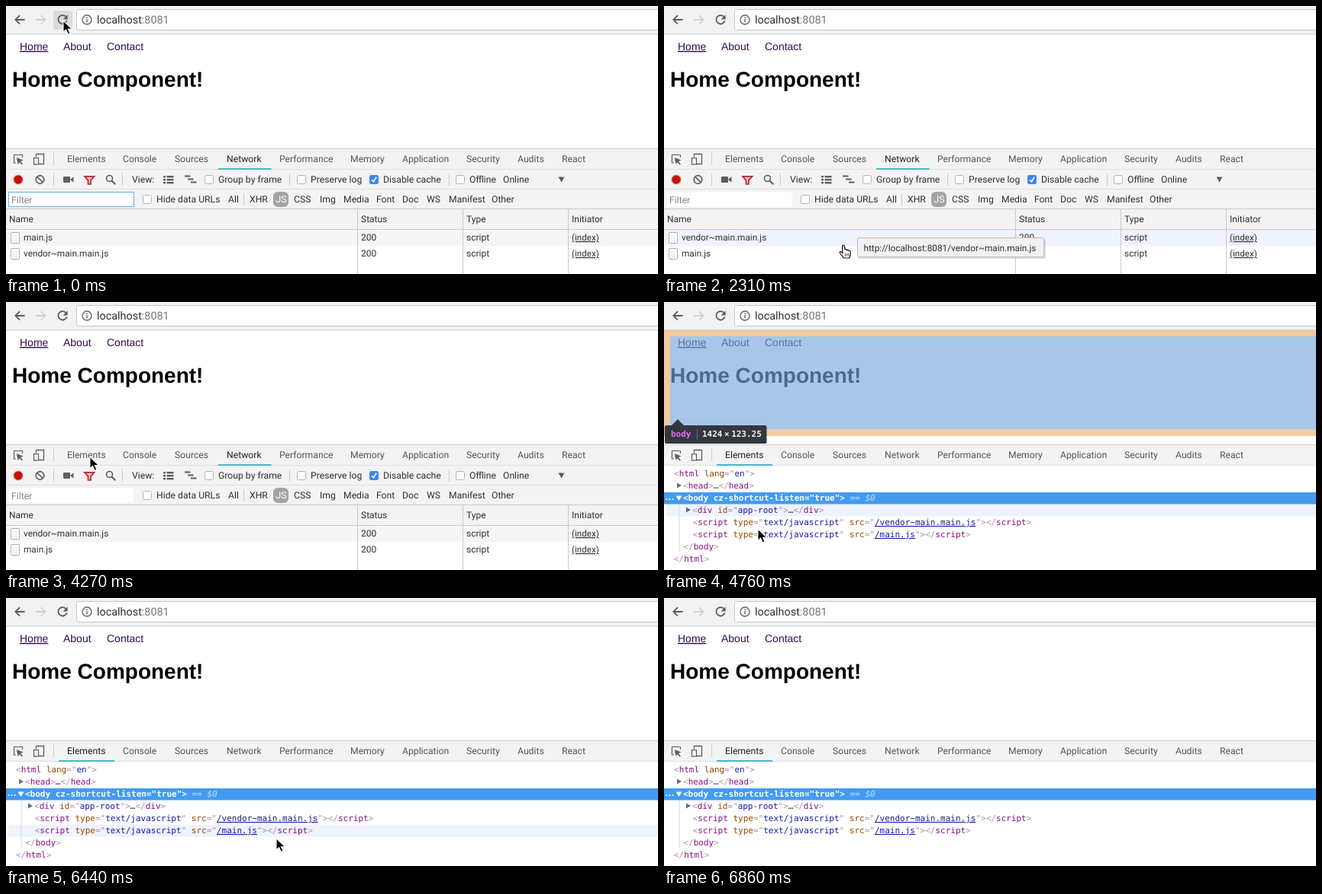
Recreate the animation shown at these times as an HTML page. Size 854 by 352 pixels, loop 6.93 s.

```html
<!DOCTYPE html>
<html lang="en">
<head>
<meta charset="utf-8">
<title>Reloading with developer tools</title>
<style>
html, body { margin: 0; width: 100%; height: 100%; overflow: hidden; background: #fff; }
svg { display: block; width: 854px; height: 352px; }
text { white-space: pre; text-rendering: geometricPrecision; font: 12px Roboto, Arial, sans-serif; fill: #303030; }
text.page { font-family: "Liberation Sans", Arial, sans-serif; fill: #30104c; }
text.code { font: 11px "DejaVu Sans Mono", monospace; fill: #a894a6; }
.n { fill: #881280; }
.a { fill: #994500; }
.v { fill: #1a1aa6; }
.u { text-decoration: underline; }
</style>
</head>
<body>
<svg id="stage" viewBox="0 0 854 352"></svg>
<script>
const LOOP = 6930, STEP = 70;

const rect = (x, y, w, h, fill, more = '') =>
  `<rect x="${x}" y="${y}" width="${w}" height="${h}" fill="${fill}" ${more}/>`;
const path = (d, stroke, width = 1, fill = 'none') =>
  `<path d="${d}" stroke="${stroke}" stroke-width="${width}" fill="${fill}"/>`;
const label = (x, y, str, size = 12, more = '') =>
  `<text x="${x}" y="${y}" style="font-size:${size}px" ${more}>${str}</text>`;
const group = (id, body) => `<g id="${id}">${body}</g>`;
const hline = (y, color = '#cbcbcb') => rect(0, y, 854, 1, color);
const vline = (x, y, h, color = '#cbcbcb') => rect(x, y, 1, h, color);

function browserBar() {
  return rect(0, 0, 854, 37, '#f2f2f2') + hline(36.5, '#cfcfcf')
    + rect(62, 6, 25, 25, '#dcdcdc', 'rx="3" id="buttonHover"')
    + path('M24.5 18H12.5M18 12.3L12.3 18L18 23.7', '#5a5a5a', 1.8)
    + path('M39.5 18H51.5M46 12.3L51.7 18L46 23.7', '#d0d0d0', 1.8)
    + group('reload', path('M78.6 14.2A5.7 5.7 0 1 0 79.6 19.5', '#5a5a5a', 1.8)
      + path('M80.6 11.5V17.4H74.7Z', 'none', 0, '#5a5a5a'))
    + group('stop', path('M69 13L79 23M79 13L69 23', '#5a5a5a', 1.8))
    + rect(92.5, 4.5, 780, 27, '#fff', 'rx="3" stroke="#c6c6c6"')
    + '<circle cx="106" cy="18" r="6" fill="none" stroke="#5f5f5f" stroke-width="1.3"/>'
    + rect(105.3, 17, 1.4, 4.4, '#5f5f5f') + rect(105.3, 14.4, 1.4, 1.5, '#5f5f5f')
    + label(119, 23, 'localhost<tspan fill="#777">:8081</tspan>', 14.4, 'fill="#222"');
}

function webPage() {
  const link = (x, str, cls = '') => label(x, 58, str, 14, `class="page ${cls}"`);
  return link(18, 'Home', 'u') + link(75, 'About') + link(132, 'Contact')
    + label(8, 106, 'Home Component!', 28, 'class="page" font-weight="bold" fill="#000"')
      .replace('style="', 'style="fill:#000;font-weight:bold;');
}

function inspectOverlay() {
  return path('M0 37H854V45H8V167.500H854V176H0Z', 'none', 0, 'rgba(240,178,110,.68)')
    + rect(8, 45, 846, 122.5, 'rgba(118,166,220,.64)')
    + path('M9 163L18 154L27 163Z', 'none', 0, '#333740')
    + rect(1, 162, 133.5, 24, '#333740', 'rx="2"') + vline(43, 167, 14, '#6b6e75')
    + '<text class="code" x="9" y="177" style="font-weight:bold;fill:#e56cea">body</text>'
    + '<text class="code" x="50" y="177" style="font-weight:bold;fill:#f2f2f2">1424'
    + '<tspan dx="2.500">×</tspan><tspan dx="2.500">123.25</tspan></text>';
}

const TABS = [['Elements', 80], ['Console', 153], ['Sources', 221], ['Network', 289],
  ['Performance', 358], ['Memory', 451], ['Application', 519], ['Security', 603],
  ['Audits', 670], ['React', 728]];

function tabBar() {
  return rect(0, 187, 854, 28, '#f3f3f3') + hline(187) + hline(214.5)
    + path('M13 206H10.500V195.500H21.500V199', '#5e5e5e', 1.2)
    + path('M14 199L22.500 202.500L19 204L22 207.500L20.500 208.500L17.700 205.300L15.500 208Z', 'none', 0, '#5e5e5e')
    + path('M39.500 198V194.500H49.500V207.500H43', '#5e5e5e', 1.3)
    + rect(36.5, 199.5, 6, 8.5, '#f3f3f3', 'stroke="#5e5e5e" stroke-width="1.2"')
    + vline(62, 193, 16)
    + TABS.map(([name, x]) => label(x, 205, name, 12.2, `id="tab${name}"`)).join('')
    + rect(0, 213, 73, 2, '#45b8c8', 'id="tabLine"');
}

const box = (x, y) => rect(x + .5, y + .5, 11, 11, '#fff', 'rx="2" stroke="#b4b4b4"');

function networkTools() {
  const gray = '#5e5e5e';
  const bars = [224, 228, 232].map((y, i) =>
    rect(206, y - 1, 3, 2.4, gray) + rect(210.5, y - 1, 9, 2.4, gray)
    + rect(234 + i * 4, y - 1.5, 7.5, 2, gray)).join('');
  return rect(0, 215, 854, 26, '#f3f3f3') + hline(240.5)
    + '<circle cx="16" cy="228" r="7" fill="#f0c4c0"/><circle cx="16" cy="228" r="5.800" fill="#c3140d"/>'
    + '<circle cx="44.500" cy="228" r="5.300" fill="none" stroke="#5e5e5e" stroke-width="1.700"/>'
    + path('M40.700 224.200L48.300 231.800', gray, 1.7)
    + vline(62, 220, 16)
    + rect(75, 224, 9, 8, gray, 'rx="1"') + path('M84 228L88.500 224.300V231.700Z', 'none', 0, gray)
    + path('M103 223.800H115.500L111 229V234H107.500V229Z', '#b9252c', 1.7, '#efb9bc')
    + '<circle cx="135.500" cy="226.500" r="4" fill="none" stroke="#5e5e5e" stroke-width="1.600"/>'
    + path('M138.500 229.500L143.300 234.300', gray, 2)
    + vline(152, 220, 16) + label(165, 232, 'View:', 12.2) + bars
    + box(260, 222) + label(278, 232, 'Group by frame', 12.2)
    + vline(371, 220, 16) + box(381, 222) + label(399, 232, 'Preserve log', 12.2)
    + rect(476, 222, 12, 12, '#3d86ee', 'rx="2.500"') + path('M479 228.300L481.300 230.700L485.200 224.800', '#fff', 1.6)
    + label(494, 232, 'Disable cache', 12.2)
    + vline(580, 220, 16) + box(589, 222) + label(607, 232, 'Offline', 12.2)
    + label(651, 232, 'Online', 12.2) + path('M723.500 224.500H731.500L727.500 231.500Z', 'none', 0, gray);
}

function filterBar() {
  const kinds = [['All', 291], ['XHR', 319], ['CSS', 377], ['Img', 411], ['Media', 442],
    ['Font', 485], ['Doc', 519], ['WS', 551], ['Manifest', 580], ['Other', 636]];
  return rect(0, 241, 854, 26, '#f3f3f3') + hline(266)
    + rect(3.5, 244.5, 164, 19, '#fff', 'id="filterBox"')
    + label(7, 259, 'Filter', 12.2).replace('style="', 'style="fill:#858585;')
    + box(179, 248) + label(197, 258, 'Hide data URLs', 12.2) + vline(311, 246, 16)
    + kinds.map(([name, x]) => label(x, 258, name, 12.2)).join('')
    + rect(350, 244, 20, 20, '#a4a4a4', 'rx="6"')
    + label(353.5, 258, 'JS', 12.2).replace('style="', 'style="fill:#fff;');
}

function fileRow(i) {
  const y = 294 + i * 21, base = y + 14;
  return group('row' + i, rect(0, y, 854, 21, '#fff', `id="rowBack${i}"`)
    + rect(6.5, y + 3.5, 11, 14, '#fff', 'rx="1" stroke="#a9a9a9"')
    + path(`M9 ${y + 8.500}H15M9 ${y + 11}H15M9 ${y + 13.500}H15`, '#e4e4e4')
    + label(23, base, '', 11.8, `id="file${i}"`) + label(465, base, '200')
    + label(603, base, 'script') + label(741, base, '(index)', 11.6, 'class="u"'));
}

function networkPanel() {
  const columns = [['Name', 4], ['Status', 465], ['Type', 603], ['Initiator', 741]];
  return networkTools() + filterBar()
    + rect(0, 267, 854, 85, '#fff') + rect(0, 267, 854, 26, '#f3f3f3') + hline(293)
    + columns.map(([name, x]) => label(x, 284, name)).join('')
    + fileRow(0) + fileRow(1)
    + [460, 598, 736].map(x => vline(x, 267, 85)).join('');
}

const span = (cls, str) => `<tspan class="${cls}">${str}</tspan>`;
const attr = (name, value, cls = 'v') => ' ' + span('a', name) + '="' + span(cls, value) + '"';
const open = (name, attrs = '') => '&lt;' + span('n', name) + attrs + '&gt;';
const close = name => '&lt;/' + span('n', name) + '&gt;';
const code = (x, line, str, more = '') =>
  `<text class="code" x="${x}" y="${229 + line * 16}" ${more}>${str}</text>`;
const script = (line, src) => code(37.5, line,
  open('script', attr('type', 'text/javascript') + attr('src', src, 'v u')) + close('script'));
const dots = span('', '<tspan fill="#333">…</tspan>');

function elementsPanel() {
  const white = 'style="fill:#fff;font-weight:bold"';
  return rect(0, 215, 854, 137, '#fff')
    + rect(3, 0, 851, 16, '#eef3fd', 'rx="2" id="nodeHover"')
    + vline(19.5, 266, 62, '#dadada')
    + rect(0, 250, 854, 15.5, '#439bf0')
    + code(13, 0, open('html', attr('lang', 'en')))
    + path('M17 237.500V244.500L23 241Z', 'none', 0, '#6e6e6e')
    + code(25, 1, open('head') + dots + close('head'))
    + [3.5, 7.5, 11.5].map(x => `<circle cx="${x}" cy="259" r="1.100" fill="#fff"/>`).join('')
    + path('M15.500 254.500H23.500L19.500 261Z', 'none', 0, '#fff')
    + code(25, 2, '&lt;body cz-shortcut-listen="true"&gt;', white)
    + code(243.5, 2, '== <tspan font-style="italic">$0</tspan>', 'style="fill:#c4e0fb"')
    + path('M29 269.500V276.500L35 273Z', 'none', 0, '#6e6e6e')
    + code(37, 3, open('div', attr('id', 'app-root')) + dots + close('div'))
    + script(4, '/vendor~main.main.js') + script(5, '/main.js')
    + code(25.5, 6, close('body')) + code(13, 7, close('html'));
}

const tip = (id, x, y, w, h, str, size) => group(id,
  rect(x + 1, y + 2, w + 1, h, '#000', 'opacity=".13" rx="2"')
  + rect(x + .5, y + .5, w - 1, h - 1, '#f1f1f1', 'stroke="#bdbdbd" rx="1"')
  + label(x + 8.5, y + h / 2 + 4.5, str, size));

const arrow = path('M0 0V15.500L3.600 12.200L6.200 18L9 16.800L6.500 11.200H11.400Z', '#fff', 1.1, '#000');
const hand = path('M-1.500 1C-1.500-.8 1.300-.8 1.500 1L2.200 6C2.500 4.500 4.600 4.800 4.700 6.300'
  + 'C5.500 5.200 7 5.600 7.200 7C8.300 6.500 9.300 7 9.300 8.500V11.500C9.300 13.500 8 14 8 16.500H0'
  + 'C-.5 13.500-4.500 11.500-5 9C-4.700 7.500-2.800 8-1 10Z', '#111', 1.2, '#fff')
  + path('M2.500 10.500V14M4.700 10.500V14M6.800 10.500V14', '#111', .8);

document.getElementById('stage').innerHTML =
  rect(0, 0, 854, 352, '#fff') + webPage() + browserBar() + group('overlay', inspectOverlay())
  + tabBar() + group('network', networkPanel()) + group('elements', elementsPanel())
  + tip('urlTip', 253, 304, 245, 26, 'http://localhost:8081/vendor~main.main.js', 11.8)
  + tip('searchTip', 123.5, 243, 55.5, 26, 'Search', 12)
  + group('cursor', group('arrow', arrow) + group('hand', hand));

const ui = {};
document.querySelectorAll('[id]').forEach(el => ui[el.id] = el);
const show = (el, on) => el.setAttribute('display', on ? 'inline' : 'none');
const set = (el, attrs) => Object.entries(attrs).forEach(([k, v]) => el.setAttribute(k, v));

// Pointer path: time, x, y
const TRACK = [[0, 75, 19], [910, 75, 19], [1260, 88, 62], [1470, 88, 62], [2030, 238, 294],
  [2170, 238, 297], [2310, 235, 314.5], [2450, 230, 306], [2800, 138, 231], [2870, 131, 221],
  [4060, 131, 221], [4340, 106, 200], [4480, 106, 200], [4690, 118, 274], [4760, 123, 298],
  [5320, 158, 299], [5600, 158, 299], [6160, 295, 305], [6370, 342, 311], [6440, 354, 315.5],
  [6650, 380, 358], [LOOP, 380, 358]];

function pointer(t) {
  const i = TRACK.findIndex((k, n) => n && t < k[0]);
  const [t0, x0, y0] = TRACK[i - 1], [t1, x1, y1] = TRACK[i];
  const p = (t - t0) / (t1 - t0), e = p * p * (3 - 2 * p);
  return { x: x0 + (x1 - x0) * e, y: y0 + (y1 - y0) * e };
}

function render(time) {
  const t = Math.floor(time % LOOP / STEP) * STEP;
  const at = (from, to) => t >= from && t < to;
  const pos = pointer(t), lag = pointer(Math.max(0, t - STEP));
  const inspecting = t >= 4410;

  show(ui.network, !inspecting);
  show(ui.elements, inspecting);
  set(ui.tabLine, inspecting ? { x: 69, width: 73 } : { x: 278, width: 69.5 });
  const active = inspecting ? 'Elements' : 'Network';
  TABS.forEach(([name]) => ui['tab' + name].style.fill = name === active ? '#222' : '#555');

  const loading = at(140, 490);
  show(ui.reload, !loading);
  show(ui.stop, loading);
  show(ui.buttonHover, pos.x > 62 && pos.x < 87 && pos.y < 31);
  ui.filterBox.setAttribute('stroke', t < 140 ? '#62b0e8' : 'none');

  const files = ['vendor~main.main.js', 'main.js'];
  if (t < 210) files.reverse();
  files.forEach((name, i) => {
    const top = 294 + i * 21, hover = lag.y >= top && lag.y < top + 21;
    show(ui['row' + i], !at(210, 420 + i * 70));
    ui['file' + i].textContent = name;
    ui['rowBack' + i].setAttribute('fill', hover ? '#eff3fd' : i ? '#fff' : '#f5f5f5');
  });

  const node = Math.floor((lag.y - 217.5) / 16);
  show(ui.nodeHover, node >= 0 && node < 8);
  ui.nodeHover.setAttribute('y', 217.5 + node * 16);
  show(ui.overlay, at(4760, 4900));

  show(ui.urlTip, at(2170, 2520));
  show(ui.searchTip, at(3360, 4130));

  const pointing = !inspecting && pos.y > 294;
  show(ui.hand, pointing);
  show(ui.arrow, !pointing);
  show(ui.cursor, pos.y < 352);
  ui.cursor.setAttribute('transform', `translate(${pos.x} ${pos.y})`);
}

const start = performance.now();
function tick() {
  render(performance.now() - start);
  requestAnimationFrame(tick);
}
tick();
</script>
</body>
</html>
```
